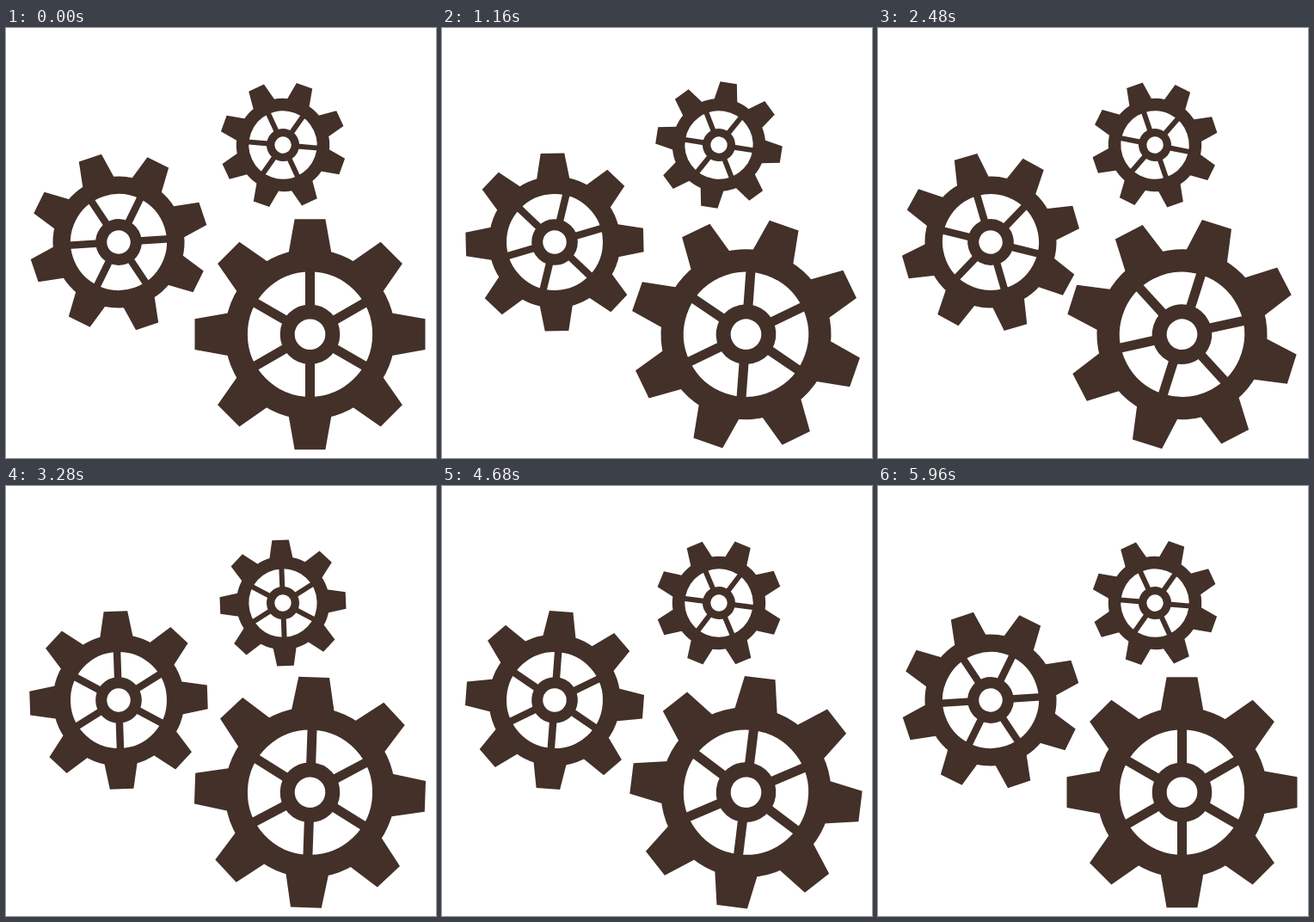
These frames come from a looping animation (500 px wide and 500 px high, 6 s). An HTML page:

```html
<!DOCTYPE html>
<html lang="en">
<head>
<meta charset="utf-8">
<title>Gears</title>
<style>
html, body { margin: 0; width: 100%; height: 100%; overflow: hidden; background: #fff; }
svg { display: block; width: 100vw; height: 100vh; }
</style>
</head>
<body>
<svg viewBox="0 0 500 500">
  <defs>
    <path id="tooth" d="M-25 -94L-17.9 -134H17.9L25 -94Z"/>
    <path id="spoke" d="M-5.5 -30H5.5V-76H-5.5Z"/>
    <g id="gear" fill="#423029">
      <g fill="none" stroke="#423029">
        <circle r="85.8" stroke-width="26.4"/>
        <circle r="26.3" stroke-width="17"/>
      </g>
    </g>
  </defs>
</svg>
<script>
const LOOP = 6000, STEP = 40, TURN = 3080, END = 5960;
const svg = document.querySelector('svg');
const gear = document.getElementById('gear');

function addUse(parent, id, transform = '') {
  const node = document.createElementNS('http://www.w3.org/2000/svg', 'use');
  node.setAttribute('href', '#' + id);
  node.setAttribute('transform', transform);
  return parent.appendChild(node);
}

for (let i = 0; i < 8; i++) addUse(gear, 'tooth', `rotate(${i * 45})`);
for (let i = 0; i < 6; i++) addUse(gear, 'spoke', `rotate(${i * 60})`);

// Each gear swings between two angles; back holds the ease handles of its return.
const gears = [
  { x: 353.5, y: 356.2, scale: 1, from: 0, to: -360, back: [0.554, 0.568] },
  { x: 131, y: 249, scale: 0.771, from: 26.3, to: 360, back: [0.532, 0.579] },
  { x: 322, y: 136, scale: 0.546, from: -25, to: 360, back: [0.532, 0.579] }
].map(g => ({ ...g, node: addUse(svg, 'gear') }));

// Cubic ease with flat ends; x1 and x2 are the handle times.
function ease(x, x1, x2) {
  let lo = 0, hi = 1;
  for (let i = 0; i < 30; i++) {
    const s = (lo + hi) / 2, r = 1 - s;
    if (3 * x1 * s * r * r + 3 * x2 * s * s * r + s * s * s < x) lo = s;
    else hi = s;
  }
  return lo * lo * (3 - 2 * lo);
}

function swing(t, back) {
  if (t <= 0 || t >= END) return 0;
  return t < TURN
    ? ease(t / TURN, 0.465, 0.443)
    : 1 - ease((t - TURN) / (END - TURN), ...back);
}

function draw(now) {
  const t = Math.floor((now % LOOP) / STEP) * STEP;
  for (const { node, x, y, scale, from, to, back } of gears) {
    const angle = from + (to - from) * swing(t, back);
    node.setAttribute('transform', `translate(${x} ${y}) rotate(${angle}) scale(${scale})`);
  }
}

let start;
function tick(now) {
  start ??= now;
  draw(now - start);
  requestAnimationFrame(tick);
}
draw(0);
requestAnimationFrame(tick);
</script>
</body>
</html>
```
